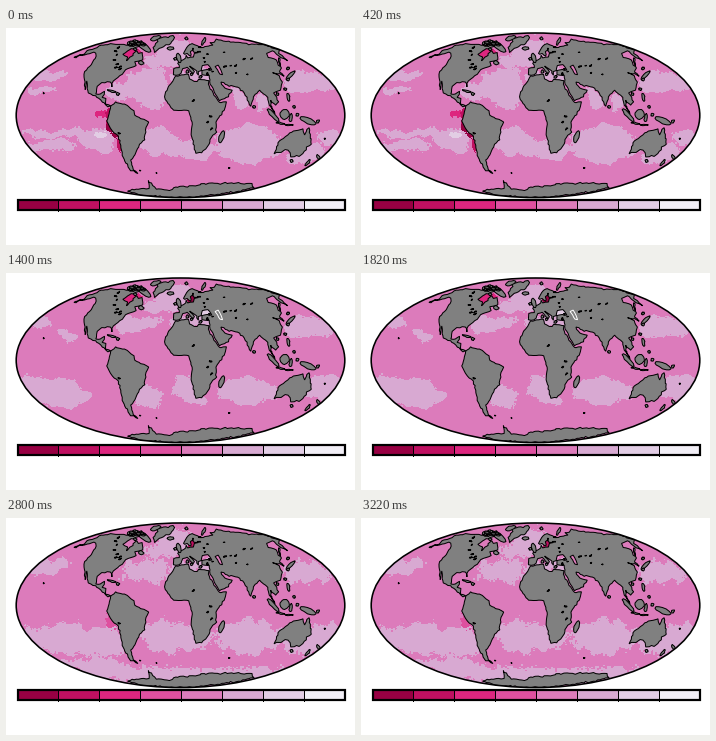
These frames come from a looping animation (349x217 px, 3500 ms). A matplotlib script:

```python
import numpy as np
import matplotlib.pyplot as plt
from matplotlib.animation import FuncAnimation
from matplotlib.patches import Ellipse, Polygon, Rectangle

W, H, DPI = 349, 217, 100
PX = 72 / DPI
CX, CY, RX, RY = 174.5, 87.3, 164.3, 82.3
GREY = "#808080"

# Eight steps through a five-colour purple-red ramp
STOPS = ["#980043", "#dd1c77", "#df65b0", "#d7b5d8", "#f1eef6"]
RGB = np.array([plt.matplotlib.colors.to_rgb(c) for c in STOPS])
POS = np.linspace(0, 4, 8)
RAMP = np.column_stack([np.interp(POS, range(5), RGB[:, c]) for c in range(3)])
DARK, RED, HOT, ROSE, PINK, LILAC, PALE, WHITE = range(8)

rng = np.random.default_rng(7)


def project(coords):
    """Mollweide projection of a flat lon, lat sequence to stage pixels."""
    lon, lat = np.array(coords, float).reshape(-1, 2).T
    lat = np.radians(np.clip(lat, -89, 89))
    t = lat * 0.9
    for _ in range(20):
        t -= (2 * t + np.sin(2 * t) - np.pi * np.sin(lat)) / (2 + 2 * np.cos(2 * t))
    return np.column_stack([CX + RX * lon / 180 * np.cos(t), CY - RY * np.sin(t)])


def roughen(pts, amp):
    """Add wobbling points along a closed outline."""
    out = []
    for p, q in zip(pts, np.roll(pts, -1, axis=0)):
        n = max(1, int(np.hypot(*(q - p)) / 2.2))
        for k in range(n):
            out.append(p + (q - p) * k / n + rng.normal(0, amp, 2) * (k > 0))
    return np.array(out)


# Coastlines as lon, lat
NORTH_AMERICA = [
    -166, 68, -156, 71, -128, 70, -95, 68, -91, 70, -82, 68, -93, 62, -94, 58,
    -82, 55, -79, 51, -77, 62, -70, 59, -65, 60, -56, 52, -66, 50, -61, 46,
    -70, 43, -76, 36, -81, 31, -80, 25.5, -84, 30, -94, 29.5, -97.5, 26, -96, 19,
    -91, 19, -87, 21.5, -88, 16, -83.5, 15, -83, 10, -77, 8.5, -80, 7.5, -94, 16,
    -105, 20, -113, 31, -110, 23, -117, 32.5, -124, 40, -124, 47, -133, 56,
    -148, 60.5, -164, 54.5, -158, 58.5, -165, 62, -161, 65]
SOUTH_AMERICA = [
    -77, 8, -72, 12, -62, 10, -51, 4, -50, 0, -35, -6, -39, -13, -41, -22,
    -48, -26, -57, -36, -65, -41, -69, -51, -66, -55, -74, -52, -73, -38,
    -70.3, -18.5, -76, -14, -81, -5, -78, 3]
AFRICA = [
    -6, 35.8, 10, 37.3, 11, 33, 20, 30.5, 22, 32.5, 34.3, 31.3, 33, 28, 37.2, 20,
    43.3, 11.5, 51, 12, 48, 4.5, 39, -6, 40.5, -15, 35, -20, 32, -28, 26, -34,
    19, -34.5, 12, -17.5, 13, -8, 9, 4, -7.5, 4.5, -17, 14, -17, 21, -10, 30]
NORTH_ASIA = [
    5, 59, 12, 66, 26, 71, 41, 67, 34, 66, 44, 66, 68, 69, 69, 72.5, 81, 73,
    104, 77.5, 113, 74, 140, 72.5, 179, 69, 178, 63, 163, 59, 157, 51, 156, 57,
    162, 62, 143, 59, 135, 54.5]
SOUTH_ASIA = [
    141, 53, 135, 43.5, 127.5, 39.5, 129, 35.5, 126, 38, 118, 39, 122, 37,
    122, 30, 115, 22.5, 106, 20, 109, 12, 105, 9, 100.5, 13.5, 99.5, 9, 103.5, 1.5,
    98, 9, 98, 16, 91, 22.5, 82, 16.5, 77.5, 8, 72.5, 20, 66.5, 25.3, 57, 26,
    48.5, 30, 51.5, 24.5, 59.5, 22.5, 54, 16.5, 43.5, 13, 35, 28, 36, 36.5, 27, 37]
EUROPE = [
    28, 41, 41, 41.5, 38, 47, 30, 46, 27, 41, 23, 40, 22.5, 36.5, 19, 42, 12.5, 45.5,
    18, 40, 16, 38, 9, 44.3, 3, 43, -2, 36.8, -9, 37, -9, 43, -1.5, 44, -4, 48.3,
    8, 54, 9, 57, 11, 54, 20, 55, 23, 59, 30, 60, 22, 61, 24, 65.5, 17, 61, 16, 56,
    11, 59, 7, 58]
ANTARCTICA = [
    -180, -84, -150, -77, -110, -74, -75, -73, -58, -63, -60, -74, -30, -76,
    -10, -71, 35, -69, 55, -66, 140, -66.5, 170, -72, 165, -78, 180, -89, -180, -89]
AUSTRALIA = [
    114, -23, 126, -14, 136, -12, 140, -17.5, 142.5, -11, 153, -26, 150, -37.5,
    140, -38, 135, -34, 130, -31.5, 116, -35]
GREENLAND = [-73, 78, -33, 83.5, -20, 80, -22, 71, -40, 65, -44, 60, -53, 66, -56, 74]
CASPIAN = [47, 45, 52, 46.5, 53, 41, 53, 37, 50, 37.5]

# Islands: lon, lat, half width, half height, tilt
ISLANDS = [
    (-72, 67, 8, 3, 40), (-110, 71, 4, 2.5, 0), (-78, 79, 5, 2, -20),
    (-19, 65, 3.5, 1.5, 0), (-2.5, 54, 2, 5, -15), (-56, 49, 2.5, 2, 0),
    (57, 74, 1.5, 4, 25), (143, 50, .8, 4, -10), (138, 36.5, 6, 1.6, -45),
    (121, 16, 1.5, 4, -10), (114, 1, 4.5, 5, 30), (101.5, 0, 8.5, 2, 47),
    (110, -7.2, 4.5, .9, 8), (121, -2, 1.5, 4, 10), (140, -5, 8.5, 2.8, 22),
    (176, -38.5, 1.3, 2.8, -30), (170.5, -43.7, 1.2, 4, 40), (46.8, -19, 2.2, 6.2, 18),
    (-79, 21.8, 4.5, .9, 14), (120, -8.7, 4, .6, 0)]
ISLETS = [
    (-8, 53), (18, 78.5), (143, 43), (131, 32.5), (121, 23.5), (110, 19), (125, 7.5),
    (146.5, -42), (81, 7.5), (-71, 19), (9, 40), (14, 37.5), (25, 35), (-84, 64),
    (151, -5.5), (128, .5)]
SPECKS = [(-59.5, -51.7), (69.5, -49), (-155.5, 19.7), (165, -21), (-37, -54.3)]
LAKES = [
    (-88, 47.5), (-87, 44), (-82, 44.5), (-80, 42.5), (-98, 52), (-113, 61.5),
    (-120, 66), (-103, 57.5), (32, 61), (60, 45), (76, 46), (107, 53), (33, -1),
    (30, -6), (34.5, -12), (14, 13), (-69, -16)]

# Sea patches in stage pixels: centre, half width, half height
ATLANTIC = [(140, 58, 23, 18), (115, 63, 13, 9), (146, 74, 14, 8)]
NORDIC = [(168, 23, 17, 15), (152, 35, 12, 6), (192, 48, 27, 7)]
EAST = [(303, 54, 25, 11)]
WEST = [(42, 47, 20, 5), (32, 62, 15, 4)]
SOUTH = [(150, 113, 22, 13), (185, 122, 26, 9), (242, 116, 34, 19), (302, 126, 22, 9)]
POLAR = (PINK, 205, 9, 45, 4)
HUDSON = 127, 26, 9, 6
BALTIC = 186, 26, 5, 5
BLACK_SEA = 202, 41, 7, 5

SCENES = [
    dict(base=PINK, other=LILAC, rough=1, caspian=PINK,
         patches=ATLANTIC + NORDIC + EAST + WEST + SOUTH + [
             (234, 71, 8, 10), (255, 74, 6, 8), (58, 106, 42, 4), (92, 112, 19, 13),
             (44, 117, 24, 6), (322, 110, 13, 8)],
         spots=[(PALE, 95, 107, 6, 3), (HOT, 97, 86, 8, 3), (RED, 104, 91, 4, 12),
                (DARK, 104, 99, 5, 5), (DARK, 110, 106, 5, 4), (RED, 114, 116, 3, 9),
                (HOT, *HUDSON), POLAR]),
    dict(base=LILAC, other=PINK, rough=2, caspian=WHITE,
         patches=[(45, 87, 65, 9), (160, 88, 28, 9), (280, 88, 68, 10),
                  (65, 50, 25, 13), (85, 67, 12, 5), (136, 40, 15, 8),
                  (85, 118, 42, 8), (98, 133, 24, 11), (175, 143, 115, 6),
                  (155, 138, 30, 7), (213, 111, 5, 10), (288, 53, 16, 4)],
         spots=[(RED, *BALTIC), (PINK, *HUDSON)]),
    dict(base=PINK, other=LILAC, rough=1, caspian=WHITE,
         patches=NORDIC + EAST + [
             (36, 48, 13, 5), (61, 62, 11, 4), (130, 51, 26, 8), (38, 114, 36, 10),
             (54, 124, 30, 11), (142, 125, 16, 10), (179, 113, 14, 12),
             (190, 125, 14, 5), (241, 118, 32, 13), (316, 114, 21, 13)],
         spots=[(PALE, *BLACK_SEA), (DARK, *BALTIC), (HOT, *HUDSON), POLAR]),
    dict(base=PINK, other=LILAC, rough=1, caspian=DARK,
         patches=ATLANTIC + NORDIC + EAST + WEST + SOUTH + [
             (60, 91, 46, 7), (58, 110, 48, 8), (90, 118, 24, 10), (101, 61, 11, 7)],
         spots=[(PINK, 162, 116, 15, 7), (ROSE, 113, 114, 3, 10), (DARK, *BLACK_SEA),
                (DARK, *BALTIC), (DARK, *HUDSON), (WHITE, 208, 62, 6, 12),
                (DARK, 219, 58, 5, 5), POLAR]),
    dict(base=PINK, other=LILAC, rough=2, caspian=PINK,
         patches=NORDIC + EAST + [
             (42, 48, 22, 8), (140, 53, 25, 11), (54, 121, 44, 15), (95, 124, 28, 15),
             (170, 119, 36, 15), (242, 119, 34, 17), (308, 121, 33, 15),
             (185, 156, 110, 10), (85, 147, 34, 7)],
         spots=[(PINK, 205, 144, 82, 6), (ROSE, 106, 103, 6, 7), (RED, *BALTIC),
                POLAR]),
]


def sea(scene):
    """Colour every sea pixel from elliptical patches with ragged borders."""
    x, y = np.meshgrid(np.arange(W) + .5, np.arange(H) + .5)
    rough = scene["rough"]
    jitter = rng.normal(0, rough * .7, (2, H // 2 + 1, W // 2 + 1))
    jx, jy = jitter.repeat(2, 1).repeat(2, 2)[:, :H, :W]
    wx = x + jx * 1.5 + 3 * np.sin(y / 4 + 2 * np.sin(x / 23))
    wy = y + jy + 2 * np.sin(x / 7 + 2 * np.sin(y / 9)) + rough * np.sin(x / 2.7)
    level = np.full((H, W), scene["base"])
    for cx, cy, rx, ry in scene["patches"]:
        level[((wx - cx) / rx) ** 2 + ((wy - cy) / ry) ** 2 < 1] = scene["other"]
    for value, cx, cy, rx, ry in scene["spots"]:
        level[((x + jx - cx) / rx) ** 2 + ((y + jy - cy) / ry) ** 2 < 1] = value
    img = RAMP[level]
    img[((x - CX) / RX) ** 2 + ((y - CY) / RY) ** 2 > 1] = 1
    return img


fig = plt.figure(figsize=(W / 100, H / 100), dpi=DPI, facecolor="white")
ax = fig.add_axes([0, 0, 1, 1])
ax.axis("off")

seas = [sea(s) for s in SCENES]
view = ax.imshow(seas[0], extent=(0, W, H, 0), interpolation="nearest", aspect="auto")
rim = Ellipse((CX, CY), 2 * RX, 2 * RY, fc="none", ec="black", lw=1.6 * PX, zorder=5)
ax.add_patch(rim)


def outline(pts, fill=GREY, amp=.45):
    patch = Polygon(roughen(pts, amp), fc=fill, ec="black", lw=PX, zorder=3)
    ax.add_patch(patch)
    patch.set_clip_path(rim)
    return patch


def oval(lon, lat, rx, ry, tilt=0, fill=GREY):
    t = np.arange(0, 2 * np.pi, .5)
    a = np.radians(tilt)
    u, v = rx * np.cos(t), ry * np.sin(t)
    turned = np.column_stack([u * np.cos(a) - v * np.sin(a),
                              u * np.sin(a) + v * np.cos(a)])
    outline(project([lon, lat]) + turned + rng.normal(0, .25, turned.shape), fill)


for coast in (NORTH_AMERICA, SOUTH_AMERICA, NORTH_ASIA + SOUTH_ASIA + EUROPE,
              AFRICA, ANTARCTICA, AUSTRALIA, GREENLAND):
    outline(project(coast))
for isle in ISLANDS:
    oval(*isle)
for lon, lat in ISLETS:
    oval(lon, lat, 1.5, 1.4)
for lon, lat in SPECKS:
    oval(lon, lat, .6, .4)
for lon, lat in LAKES:
    oval(lon, lat, 1.3, .4, rng.uniform(-40, 40), "black")
# Crowded northern archipelago and scattered inland waters
for _ in range(16):
    oval(rng.uniform(-122, -78), rng.uniform(69, 77), rng.uniform(1, 3), 1)
for _ in range(14):
    oval(rng.uniform(30, 110), rng.uniform(35, 62), .6, .2, 0, "black")
caspian = outline(project(CASPIAN), amp=.3)

# Colour bar
LEFT, RIGHT, UP, DOWN = 11.5, 338.5, 171.5, 181.5
STEP = (RIGHT - LEFT) / 8
for i, color in enumerate(RAMP):
    ax.add_patch(Rectangle((LEFT + i * STEP, UP), STEP, DOWN - UP, fc=color, lw=0))
for i in range(1, 8):
    ax.plot([LEFT + i * STEP] * 2, [UP, DOWN + 1.5], color="black", lw=PX)
ax.add_patch(Rectangle((LEFT, UP), RIGHT - LEFT, DOWN - UP, fc="none", ec="black",
                       lw=2.2 * PX, zorder=4))
ax.set_xlim(0, W)
ax.set_ylim(H, 0)


def draw(i):
    value = SCENES[i]["caspian"]
    view.set_data(seas[i])
    caspian.set_facecolor(GREY if value == WHITE else RAMP[value])
    caspian.set_edgecolor("white" if value == WHITE else "black")
    return view, caspian


anim = FuncAnimation(fig, draw, frames=len(SCENES), interval=700, repeat=True,
                     repeat_delay=0, blit=False)
plt.show()
```
